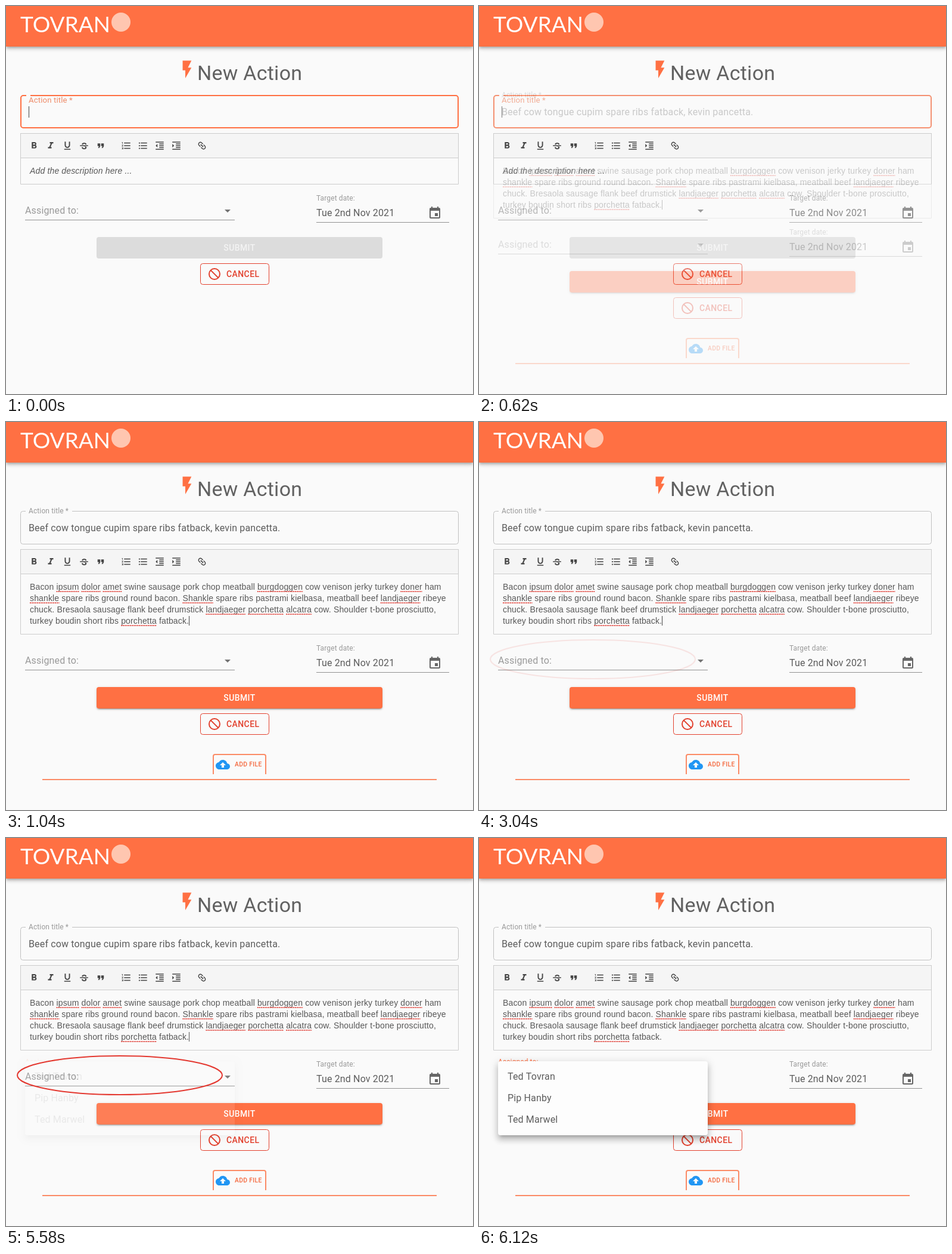
Write an HTML page with a canvas that moves like this. It is 784 px wide and 650 px high and loops after 8000 ms.

```html
<!DOCTYPE html>
<html lang="en">
<head>
<meta charset="utf-8">
<title>New Action</title>
<style>
html, body { margin: 0; width: 100%; height: 100%; overflow: hidden; background: #fafafa; }
canvas { display: block; }
</style>
</head>
<body>
<canvas id="stage" width="784" height="650"></canvas>
<script>
const W = 784, H = 650, LOOP = 8000;
const PAGE = '#fafafa', ORANGE = '#ff7043', RED = '#e2412e', INK = '#5c5c5c', FAINT = '#9a9a9a', DARK = '#444';
const ROBOTO = 'Roboto, sans-serif', ARIAL = '"Liberation Sans", Arial, sans-serif';

// Icons on a 24 unit grid
const ICONS = {
  bolt: 'M7 2v11h3v9l7-12h-4l4-8z',
  bold: 'M15.6 10.79c.97-.67 1.65-1.77 1.65-2.79 0-2.26-1.75-4-4-4H7v14h7.04c2.09 0 3.71-1.7 3.71-3.79 0-1.52-.86-2.82-2.15-3.42zM10 6.5h3c.83 0 1.5.67 1.5 1.5s-.67 1.5-1.5 1.5h-3v-3zm3.5 9H10v-3h3.5c.83 0 1.5.67 1.5 1.5s-.67 1.5-1.5 1.5z',
  italic: 'M10 4v3h2.21l-3.42 8H6v3h8v-3h-2.21l3.42-8H18V4z',
  underline: 'M12 17c3.31 0 6-2.69 6-6V3h-2.5v8c0 1.93-1.57 3.5-3.5 3.5S8.5 12.93 8.5 11V3H6v8c0 3.31 2.69 6 6 6zm-7 2v2h14v-2H5z',
  quote: 'M6 17h3l2-4V7H5v6h3zm8 0h3l2-4V7h-6v6h3z',
  numbers: 'M2 17h2v.5H3v1h1v.5H2v1h3v-4H2v1zm1-9h1V4H2v1h1v3zm-1 3h1.8L2 13.1v.9h3v-1H3.2L5 10.9V10H2v1zm5-6v2h14V5H7zm0 14h14v-2H7v2zm0-6h14v-2H7v2z',
  bullets: 'M7 19h14v-2H7v2zm0-6h14v-2H7v2zm0-8v2h14V5H7zM2.5 6a1.5 1.5 0 1 0 3 0a1.5 1.5 0 1 0-3 0zm0 6a1.5 1.5 0 1 0 3 0a1.5 1.5 0 1 0-3 0zm0 6a1.5 1.5 0 1 0 3 0a1.5 1.5 0 1 0-3 0z',
  outdent: 'M11 17h10v-2H11v2zm-8-5l4 4V8l-4 4zm0 9h18v-2H3v2zM3 3v2h18V3H3zm8 6h10V7H11v2zm0 4h10v-2H11v2z',
  indent: 'M3 21h18v-2H3v2zM3 8v8l4-4-4-4zm8 9h10v-2H11v2zM3 3v2h18V3H3zm8 6h10V7H11v2zm0 4h10v-2H11v2z',
  link: 'M3.9 12c0-1.71 1.39-3.1 3.1-3.1h4V7H7c-2.76 0-5 2.24-5 5s2.24 5 5 5h4v-1.9H7c-1.71 0-3.1-1.39-3.1-3.1zM8 13h8v-2H8v2zm9-6h-4v1.9h4c1.71 0 3.1 1.39 3.1 3.1s-1.39 3.1-3.1 3.1h-4V17h4c2.76 0 5-2.24 5-5s-2.24-5-5-5z',
  arrow: 'M7 10l5 5 5-5z',
  date: 'M17 12h-5v5h5v-5zM16 1v2H8V1H6v2H5c-1.11 0-1.99.9-1.99 2L3 19c0 1.1.89 2 2 2h14c1.1 0 2-.9 2-2V5c0-1.1-.9-2-2-2h-1V1h-2zm3 18H5V8h14v11z',
  cloud: 'M19.35 10.04C18.67 6.59 15.64 4 12 4 9.11 4 6.6 5.64 5.35 8.04 2.34 8.36 0 10.91 0 14c0 3.31 2.69 6 6 6h13c2.76 0 5-2.24 5-5 0-2.64-2.05-4.78-4.65-4.96zM14 13v4h-4v-4H7l5-5 5 5h-3z'
};

const COPY = [
  'Bacon ipsum dolor amet swine sausage pork chop meatball burgdoggen cow venison jerky turkey doner ham',
  'shankle spare ribs ground round bacon. Shankle spare ribs pastrami kielbasa, meatball beef landjaeger ribeye',
  'chuck. Bresaola sausage flank beef drumstick landjaeger porchetta alcatra cow. Shoulder t-bone prosciutto,',
  'turkey boudin short ribs porchetta fatback.'
];
const UNKNOWN = /ipsum|dolor|amet|burgdoggen|doner|shankle|landjaeger|porchetta|alcatra/gi;
const PEOPLE = ['Ted Tovran', 'Pip Hanby', 'Ted Marwel'];

// Shadow layers: y offset, blur, spread, opacity
const BAR_SHADOW = [[2, 4, -1, .2], [4, 5, 0, .14], [1, 10, 0, .12]];
const BUTTON_SHADOW = [[3, 1, -2, .2], [2, 2, 0, .14], [1, 5, 0, .12]];
const MENU_SHADOW = [[5, 5, -3, .2], [8, 10, 1, .14], [3, 14, 2, .12]];

let c;

function text(str, x, y, size, color, { weight = 400, gap = .15, family = ROBOTO, align = 'left', style = '' } = {}) {
  c.font = `${style} ${weight} ${size}px ${family}`;
  c.letterSpacing = gap + 'px';
  c.textAlign = align;
  c.fillStyle = color;
  c.fillText(str, x, y);
}

function rect(x, y, w, h, color) {
  c.fillStyle = color;
  c.fillRect(x, y, w, h);
}

function round(x, y, w, h, r) {
  c.beginPath();
  c.roundRect(x, y, w, h, r);
}

function outline(x, y, w, h, r, color, width) {
  round(x + width / 2, y + width / 2, w - width, h - width, r);
  c.strokeStyle = color;
  c.lineWidth = width;
  c.stroke();
}

function panel(x, y, w, h, r, color, shadows = []) {
  const away = 3000;
  for (const [dy, blur, spread, alpha] of shadows) {
    c.save();
    c.shadowColor = `rgba(0,0,0,${alpha})`;
    c.shadowBlur = blur;
    c.shadowOffsetX = away;
    c.shadowOffsetY = dy;
    c.fillStyle = '#000';
    round(x - spread - away, y - spread, w + 2 * spread, h + 2 * spread, r);
    c.fill();
    c.restore();
  }
  c.fillStyle = color;
  round(x, y, w, h, r);
  c.fill();
}

function icon(name, x, y, size, color, turn = 0) {
  c.save();
  c.translate(x + size / 2, y + size / 2);
  c.rotate(turn);
  c.scale(size / 24, size / 24);
  c.translate(-12, -12);
  c.fillStyle = color;
  c.fill(new Path2D(ICONS[name]));
  c.restore();
}

function header() {
  panel(0, 0, W, 68, 0, ORANGE, BAR_SHADOW);
  text('TOVRAN', 24, 44, 37, '#fff', { family: 'Lato, sans-serif', gap: 0 });
  c.fillStyle = '#ffc6b0';
  c.beginPath();
  c.arc(193, 27, 16, 0, 7);
  c.fill();
  icon('bolt', 286.2, 88.5, 35.5, ORANGE);
  text('New Action', 321, 124, 34, '#616161', { gap: .25 });
}

function titleField(filled) {
  if (filled) {
    outline(24, 149, 736, 56, 4, '#c1c1c1', 1);
    rect(33, 148, 78, 3, PAGE);
    text('Action title *', 38, 153, 12, FAINT, { gap: .11 });
    text('Beef cow tongue cupim spare ribs fatback, kevin pancetta.', 38, 183, 16, INK);
  } else {
    outline(24, 149, 736, 56, 4, ORANGE, 2);
    rect(34, 148, 7, 4, PAGE);
    text('Action title *', 38, 162, 13.2, '#ee8b69', { gap: .12 });
    rect(38, 168, 1, 19, DARK);
  }
}

function toolbar() {
  rect(24, 213, 736, 42, '#ccc');
  rect(25, 214, 734, 40, '#f5f5f5');
  const put = (name, i, group, turn) => icon(name, 38 + 28 * i + 15 * group, 225, 18, DARK, turn);
  ['bold', 'italic', 'underline'].forEach((n, i) => put(n, i, 0));
  text('S', 131, 239.5, 15, DARK, { weight: 700, gap: 0, align: 'center' });
  rect(124, 232.2, 14, 3.2, '#f5f5f5');
  rect(124.2, 233.2, 13.6, 1.5, DARK);
  put('quote', 4, 0);
  ['numbers', 'bullets', 'outdent', 'indent'].forEach((n, i) => put(n, 5 + i, 1));
  put('link', 9, 2, Math.PI / 4);
}

function copyLine(line, y) {
  text(line, 40, y, 14, '#585858', { family: ARIAL });
  c.strokeStyle = '#e4564f';
  c.lineWidth = 2;
  c.setLineDash([2, 1]);
  for (const m of line.matchAll(UNKNOWN)) {
    const x = 40 + c.measureText(line.slice(0, m.index)).width;
    c.beginPath();
    c.moveTo(x, y + 3);
    c.lineTo(x + c.measureText(m[0]).width, y + 3);
    c.stroke();
  }
  c.setLineDash([]);
}

function editor(filled, caret) {
  const bottom = filled ? 356 : 299;
  outline(24, 254, 736, bottom - 254, 0, '#ccc', 1);
  if (filled) COPY.forEach((line, i) => copyLine(line, 281 + 19 * i));
  else text('Add the description here ...', 40, 281, 14, '#585858', { family: ARIAL, style: 'italic' });
  if (caret) rect(307, 325, 1, 16, DARK);
}

function controls(filled, open) {
  if (open) text('Assigned to:', 32, 379, 12, ORANGE, { gap: .11 });
  c.save();
  c.translate(0, filled ? 57 : 0);
  if (!open) text('Assigned to:', 32, 348, 16, FAINT);
  rect(32, 358, 352, 1, '#919191');
  icon('arrow', 360, 331, 24, '#737373');
  text('Target date:', 521, 326, 12, FAINT, { gap: .11 });
  text('Tue 2nd Nov 2021', 521, 352, 16, INK);
  rect(521, 362, 223, 1, '#919191');
  icon('date', 708, 335, 24, '#666');

  panel(152, 387, 480, 36, 4, filled ? ORANGE : '#dcdcdc', filled ? BUTTON_SHADOW : []);
  text('SUBMIT', 392, 410, 14, filled ? '#fff' : '#f3f3f3', { weight: 500, gap: .4, align: 'center' });

  outline(326, 431, 116, 36, 4, RED, 1);
  c.lineWidth = 2;
  c.beginPath();
  c.arc(350, 449, 9, 0, 2 * Math.PI);
  c.moveTo(343.6, 442.6);
  c.lineTo(356.4, 455.4);
  c.stroke();
  text('CANCEL', 370, 454, 14, RED, { weight: 500, gap: .4 });
  c.restore();
}

function addFile() {
  c.strokeStyle = '#fb8b66';
  c.lineWidth = 2;
  c.beginPath();
  c.moveTo(348, 590);
  c.lineTo(348, 560);
  c.arcTo(348, 557, 351, 557, 3);
  c.lineTo(433, 557);
  c.arcTo(436, 557, 436, 560, 3);
  c.lineTo(436, 590);
  c.stroke();
  icon('cloud', 352, 562, 24, '#2196f3');
  text('ADD FILE', 384, 577, 10.4, '#f4683d', { weight: 500, gap: .3 });
  rect(61, 598, 662, 2, '#fb8b66');
}

function ring() {
  c.strokeStyle = '#e2231a';
  c.lineWidth = 2;
  c.beginPath();
  c.ellipse(191, 397.5, 172, 32.5, 0, 0, 2 * Math.PI);
  c.stroke();
}

function menu() {
  panel(32, 374, 352, 124, 4, '#fdfdfd', MENU_SHADOW);
  PEOPLE.forEach((name, i) => text(name, 48, 405 + 36 * i, 16, INK));
}

function scene({ filled = true, circled = false, open = false }) {
  const sheet = document.createElement('canvas');
  sheet.width = W;
  sheet.height = H;
  c = sheet.getContext('2d');
  rect(0, 0, W, H, PAGE);
  header();
  titleField(filled);
  toolbar();
  editor(filled, filled && !open);
  controls(filled, open);
  if (filled) addFile();
  if (circled) ring();
  if (open) menu();
  return sheet;
}

const scenes = [{ filled: false }, {}, { circled: true }, { open: true }].map(scene);
const FADES = [500, 3040, 5580], STEP = 60, STEPS = 10;
const view = document.getElementById('stage').getContext('2d');

function draw(now) {
  const t = now % LOOP;
  view.globalAlpha = 1;
  view.drawImage(scenes[0], 0, 0);
  FADES.forEach((start, i) => {
    if (t < start) return;
    view.globalAlpha = Math.min(1, (Math.floor((t - start) / STEP) + 1) / STEPS);
    view.drawImage(scenes[i + 1], 0, 0);
  });
}

let begin;
function tick(now) {
  begin ??= now;
  draw(now - begin);
  requestAnimationFrame(tick);
}
draw(0);
requestAnimationFrame(tick);
</script>
</body>
</html>
```
